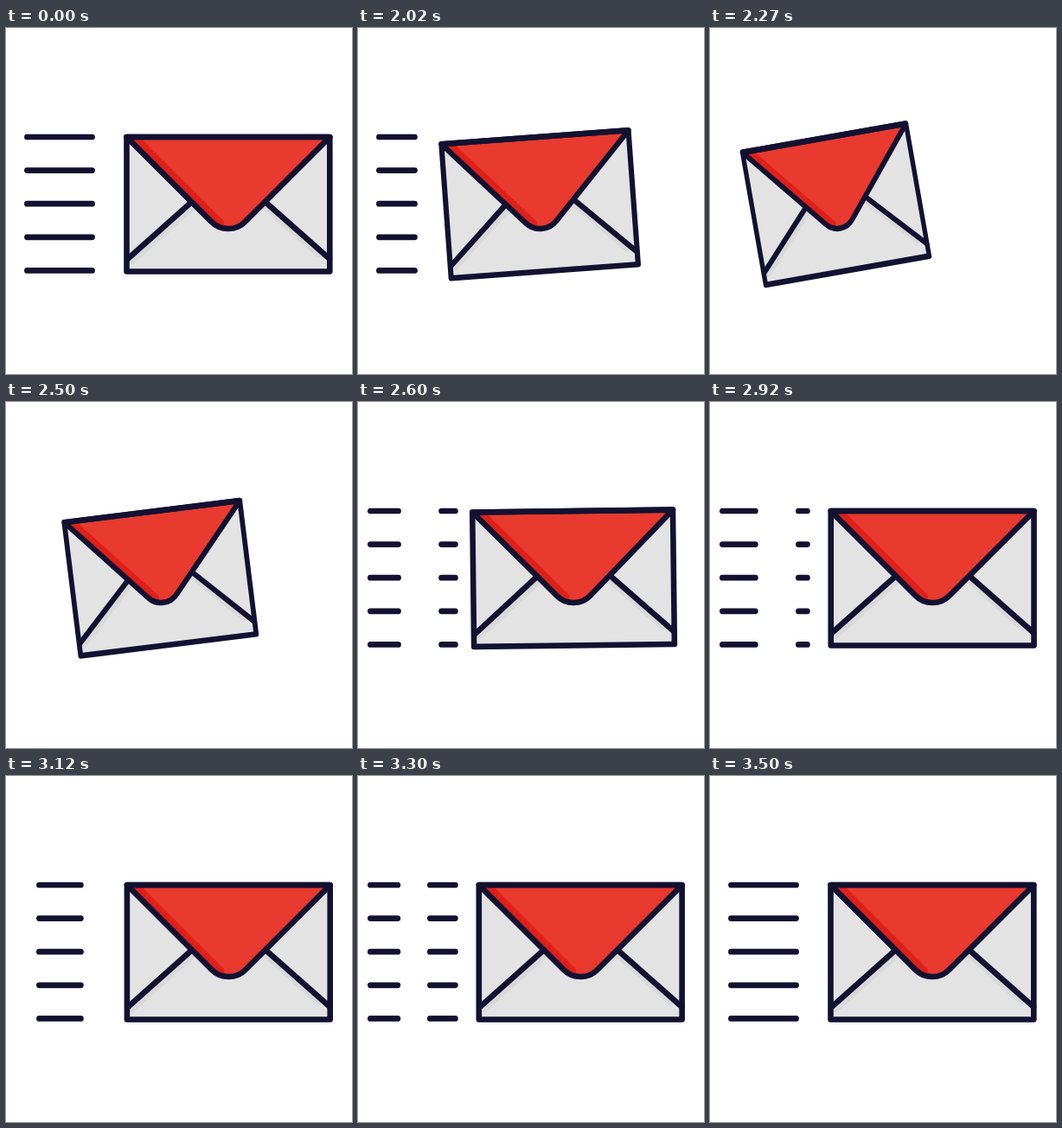
An HTML page with a canvas for the animation above (3520 ms loop, 400 px wide and 400 px high).

```html
<!DOCTYPE html>
<html lang="en">
<head>
<meta charset="utf-8">
<title>Flying envelope</title>
<style>
html, body { margin: 0; width: 100%; height: 100%; overflow: hidden; background: #fff; }
canvas { display: block; width: 100vw; height: 100vh; object-fit: contain; }
</style>
</head>
<body>
<canvas id="stage"></canvas>
<script>
const canvas = document.getElementById('stage');
const ctx = canvas.getContext('2d');
const SIZE = 400, LOOP = 3520;
const INK = '#121131', PAPER = '#e3e3e3', SHADE = '#d9d9d9', RED = '#e83a2f', DARK_RED = '#df2019';

const MOVE_START = 2020, PULL_FROM = 1838, PULL_END = 2246, SNAP_END = 2776;
const LINES_START = 2500, LINES_END = 3500;
const LINE_LEFT = 14.4, LINE_SPAN = 98, TRIM_START = 0.102, TRIM_LENGTH = 0.767;

const clamp = x => Math.min(1, Math.max(0, x));
const progress = (t, a, b) => clamp((t - a) / (b - a));
const smooth = x => x * x * (3 - 2 * x);

// Symmetric cubic bezier (a, 0, 1 - a, 1), solved by bisection.
function snapEase(x, a) {
  let lo = 0, hi = 1;
  for (let i = 0; i < 30; i++) {
    const u = (lo + hi) / 2, v = 1 - u;
    const bx = 3 * v * v * u * a + 3 * v * u * u * (1 - a) + u * u * u;
    if (bx < x) lo = u; else hi = u;
  }
  return smooth((lo + hi) / 2);
}

// 0 at rest, 1 fully drawn back.
function pullAt(t) {
  if (t < MOVE_START || t >= SNAP_END) return 0;
  if (t < PULL_END) return smooth(progress(t, PULL_FROM, PULL_END));
  return 1 - snapEase(progress(t, PULL_END, SNAP_END), 0.95);
}

// Piecewise linear value through [time, value] pairs.
function track(t, keys) {
  for (let i = 1; i < keys.length; i++) {
    const [t0, v0] = keys[i - 1], [t1, v1] = keys[i];
    if (t <= t1) return v0 + (v1 - v0) * progress(t, t0, t1);
  }
  return keys[keys.length - 1][1];
}

function stroke(color, width, ...points) {
  ctx.strokeStyle = color;
  ctx.lineWidth = width;
  ctx.beginPath();
  points.forEach(([x, y]) => ctx.lineTo(x, y));
  ctx.stroke();
}

function flapPath(dx = 0) {
  ctx.beginPath();
  ctx.moveTo(-117.4 + dx, -77.7);
  ctx.lineTo(-19.5 + dx, 20.2);
  ctx.bezierCurveTo(-9, 31, 9, 31, 19.5 + dx, 20.2);
  ctx.lineTo(117.4 + dx, -77.7);
  ctx.closePath();
}

function drawEnvelope(t, pull) {
  const settle = 0.4 * Math.sin(Math.PI * progress(t, SNAP_END, LINES_END));
  ctx.save();
  ctx.translate(256.9 - 111.5 * pull + settle, 203.75);
  ctx.rotate(-pull * Math.PI / 18);
  ctx.scale(1 - 0.183 * pull, 1);

  ctx.fillStyle = PAPER;
  ctx.fillRect(-117.4, -77.7, 234.8, 155.4);
  stroke(SHADE, 5, [-39, 3], [-111, 67]);
  stroke(SHADE, 5, [40, 2], [104, 59]);
  stroke(INK, 6.6, [-43, -2], [-116.5, 63.5]);
  stroke(INK, 6.6, [43.5, -2], [117, 63]);

  ctx.save();
  flapPath();
  ctx.fillStyle = DARK_RED;
  ctx.fill();
  ctx.clip();
  flapPath(15);
  ctx.fillStyle = RED;
  ctx.fill();
  ctx.restore();
  flapPath();
  ctx.strokeStyle = INK;
  ctx.lineWidth = 6.6;
  ctx.stroke();
  ctx.strokeRect(-117.4, -77.7, 234.8, 155.4);
  ctx.restore();
}

function lineTrim(t, pull) {
  if (t < MOVE_START || t >= LINES_END) return [TRIM_START, TRIM_LENGTH];
  if (t < LINES_START) return [TRIM_START, TRIM_LENGTH * (1 - 1.08 * pull)];
  const start = track(t, [[2500, 0.102], [2520, 0.03], [2720, -0.45], [3120, -1.755], [3500, -2.898]]);
  const length = t < 3120
    ? 0.49 * progress(t, LINES_START, 2600)
    : 0.49 + (TRIM_LENGTH - 0.49) * smooth(progress(t, 3120, LINES_END));
  return [start, length];
}

function drawLines(t, pull) {
  if (t >= PULL_END && t <= LINES_START) return;
  const [start, length] = lineTrim(t, pull);
  if (length <= 0) return;
  const from = start - Math.floor(start), to = from + length;
  const pieces = to > 1 ? [[from, 1], [0, to - 1]] : [[from, to]];
  for (let i = 0; i < 5; i++) {
    const y = 126 + 38.6 * i;
    for (const [a, b] of pieces)
      stroke(INK, 6.7, [LINE_LEFT + a * LINE_SPAN, y], [LINE_LEFT + b * LINE_SPAN, y]);
  }
}

function resize() {
  const side = Math.min(innerWidth, innerHeight) || SIZE;
  canvas.width = canvas.height = Math.round(side * (devicePixelRatio || 1));
}

function render(now) {
  const t = now % LOOP, pull = pullAt(t), k = canvas.width / SIZE;
  ctx.setTransform(k, 0, 0, k, 0, 0);
  ctx.fillStyle = '#fff';
  ctx.fillRect(0, 0, SIZE, SIZE);
  ctx.lineCap = ctx.lineJoin = 'round';
  drawLines(t, pull);
  drawEnvelope(t, pull);
}

let origin;
function tick(now) {
  origin ??= now;
  render(Math.max(0, now - origin));
  requestAnimationFrame(tick);
}

addEventListener('resize', resize);
resize();
render(0);
requestAnimationFrame(tick);
</script>
</body>
</html>
```
